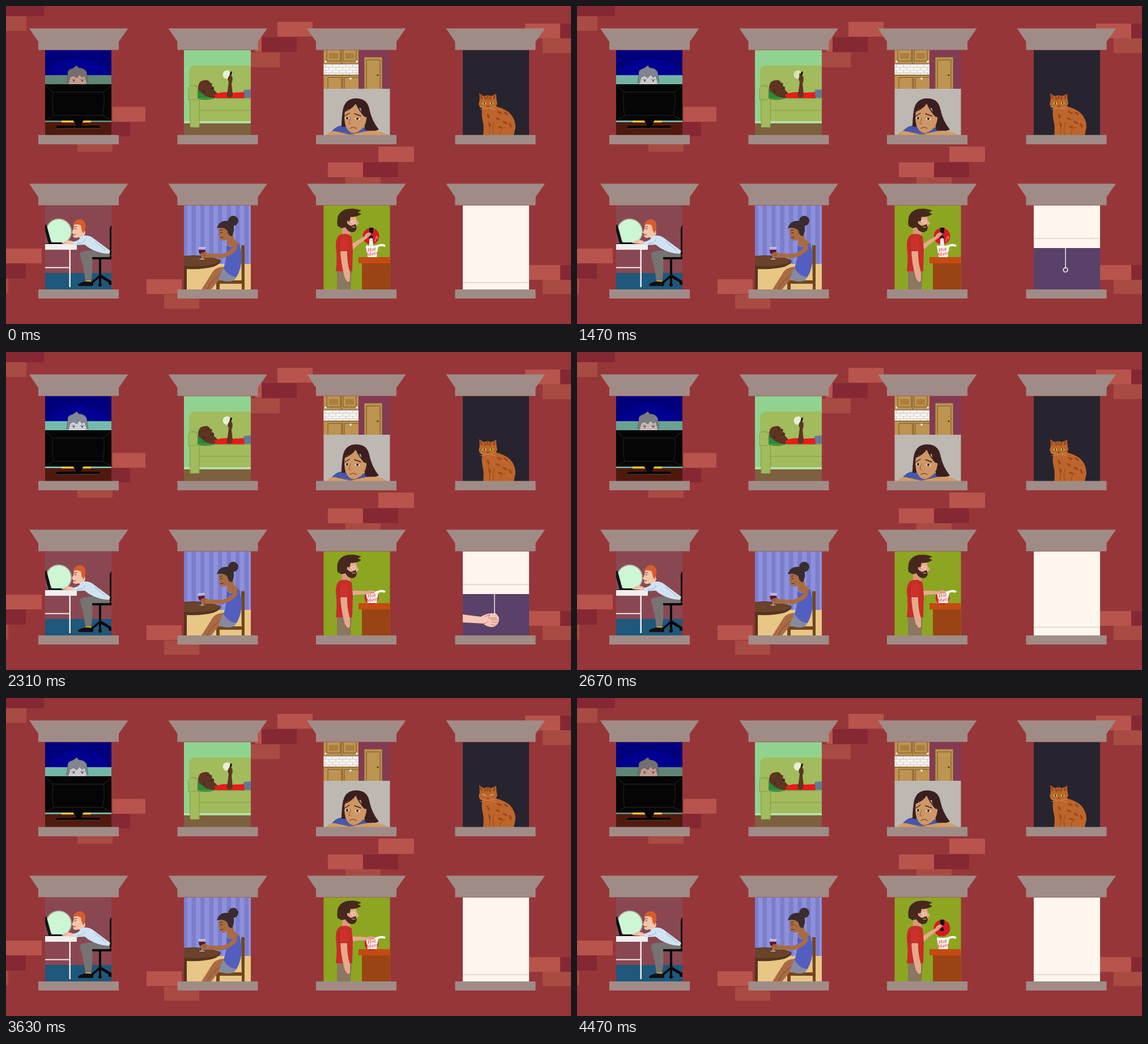
An HTML page that plays this animation: 997x561 px, repeating every 4.5 s.

```html
<!DOCTYPE html>
<html lang="en">
<head>
<meta charset="utf-8">
<title>Windows</title>
<style>
html, body { margin: 0; width: 100%; height: 100%; overflow: hidden; background: #973639; }
svg { display: block; }
#stage { width: 100vw; height: 100vh; }
.line { fill: none; stroke-linecap: round; stroke-linejoin: round; }
.stone { fill: #a08c86; }
.light { fill: #b8544c; }
.dark { fill: #852834; }
.mid { fill: #a84b43; }

/* every part shares the same 4.5 s loop */
.glow, .thumb, .phone, .open, .shut, .catopen, .catshut, .glass, .kettle, .arm, .pour, .blind, .reach {
  animation: 4.5s linear infinite;
}
.glow { animation-name: glow; }
@keyframes glow {
  0%, 3% { opacity: 0 } 7% { opacity: .5 } 10% { opacity: .2 } 15%, 18% { opacity: 1 }
  22% { opacity: .6 } 27% { opacity: .9 } 34% { opacity: .75 } 39% { opacity: .5 }
  45% { opacity: .9 } 53% { opacity: .9 } 59% { opacity: .5 } 66%, 69% { opacity: 0 }
  74% { opacity: .6 } 80%, 83% { opacity: .8 } 89% { opacity: .4 } 96%, 100% { opacity: 0 }
}
.thumb { animation-name: thumb; }
@keyframes thumb {
  0%, 28% { transform: none } 32%, 34% { transform: translate(-2px, -3px) } 38%, 100% { transform: none }
}
.phone { animation-name: phone; }
@keyframes phone {
  0%, 28% { opacity: .9 } 32%, 34% { opacity: .7 } 38%, 100% { opacity: .9 }
}
.open { animation-name: open; animation-timing-function: step-end; }
.shut { animation-name: shut; animation-timing-function: step-end; }
@keyframes open { 0%, 18.67%, 100% { opacity: 1 } 14.67% { opacity: 0 } }
@keyframes shut { 0%, 18.67%, 100% { opacity: 0 } 14.67% { opacity: 1 } }
.catopen { animation-name: catopen; animation-timing-function: step-end; }
.catshut { animation-name: catshut; animation-timing-function: step-end; }
@keyframes catopen { 0%, 92%, 100% { opacity: 1 } 65.33% { opacity: 0 } }
@keyframes catshut { 0%, 92%, 100% { opacity: 0 } 65.33% { opacity: 1 } }
.type { animation: type .3s linear infinite alternate; }
@keyframes type { to { transform: translate(-1px, -1px) } }
.glass { animation-name: glass; transform-origin: 347px 442px; animation-timing-function: ease-in-out; }
@keyframes glass {
  0%, 38% { transform: none } 44% { transform: rotate(4deg) } 51% { transform: rotate(-6deg) }
  57% { transform: rotate(4deg) } 63%, 100% { transform: none }
}
.kettle { animation-name: kettle; transform-origin: 644px 406px; animation-timing-function: ease-in-out; }
@keyframes kettle {
  0%, 38% { transform: none } 49%, 87% { transform: translate(1px, 27px) scale(.85) } 98%, 100% { transform: none }
}
.arm { animation-name: arm; transform-origin: 610px 424px; animation-timing-function: ease-in-out; }
@keyframes arm {
  0%, 38% { transform: rotate(-34deg) } 49%, 87% { transform: none } 98%, 100% { transform: rotate(-34deg) }
}
.pour { animation-name: pour; animation-timing-function: step-end; }
@keyframes pour { 0% { opacity: 1 } 37.33%, 100% { opacity: 0 } }
.stream { animation: stream .3s linear infinite; }
@keyframes stream { to { stroke-dashoffset: -10 } }
.blind { animation-name: blind; animation-timing-function: ease-in-out; }
@keyframes blind {
  0%, 9% { transform: none } 15.6% { transform: translateY(-94px) } 19% { transform: translateY(-74px) }
  22.5%, 51.5% { transform: translateY(-78px) } 60.5%, 100% { transform: none }
}
.reach { animation-name: reach; animation-timing-function: ease-out; }
@keyframes reach {
  0%, 36% { transform: translateX(-70px) } 49%, 66% { transform: none } 66.1%, 100% { transform: translateX(-70px) }
}
</style>
</head>
<body>
<svg id="stage" viewBox="0 0 997 561" preserveAspectRatio="none">
<defs>
  <g id="frame" class="stone">
    <path d="M41 39.5H215.5L199 63V77.5H57V63z"/>
    <path d="M57 227.5H199V244H57z"/>
  </g>
  <g id="frameLow" class="stone">
    <path d="M41 313.5H215.5L199 337V351.5H57V337z"/>
    <path d="M57 500H199V516H57z"/>
  </g>
  <radialGradient id="sky" cx="50%" cy="100%" r="100%" fy="100%">
    <stop offset="0" stop-color="#0000a4"/><stop offset="1" stop-color="#00008c"/>
  </radialGradient>
  <radialGradient id="screen">
    <stop offset=".88" stop-color="#cdf6d5"/><stop offset="1" stop-color="#cdf6d5" stop-opacity=".2"/>
  </radialGradient>
  <pattern id="tiles" width="12" height="10" patternUnits="userSpaceOnUse" x="561" y="103">
    <path d="M0 0H12V10H0z" fill="#f7f5f2"/>
    <path d="M0 0H12M0 5H12M3 0V5M9 5V10" stroke="#bdb7b2" stroke-width=".8"/>
  </pattern>
  <pattern id="curtain" width="15.5" height="10" patternUnits="userSpaceOnUse" x="319.5">
    <path d="M0 0H16V10H0z" fill="#7b7ecb"/>
    <path d="M0 0H8V10H0z" fill="#8d91dc"/>
  </pattern>
  <path id="face" d="M111 124Q127 117 142 124L141 139H111z"/>
  <path id="hair" d="M107 136L109 120Q108 112 118 110L125 105L128 109Q143 110 143 122L145 136L141 131L139 123L134 126L130 121L125 127L119 123L113 126L111 134z"/>
</defs>

<path d="M0 0H997V561H0z" fill="#973639"/>
<path class="light" d="M479 28h62v26h-62zM440 55h11v26h-11zM188 178h58v26h-58zM657 248h63v27h-63zM568 276h62v26h-62zM916 31h62v26h-62zM0 428h63v26H0zM248 482h62v26h-62zM923 457h55v26h-55z"/>
<path class="dark" d="M0 0h67v18H0zM451 55h62v26h-62zM186 205h33v25h-33zM630 276h62v26h-62zM978 31h19v26h-19zM0 454h35v27H0zM978 457h19v26h-19z"/>
<path class="mid" d="M0 18h36v26H0zM421 82h62v26h-62zM126 244h62v13h-62zM599 302h62v12h-62zM947 57h50v26h-50zM0 481h4v26H0zM279 509h62v25h-62zM947 483h50v25h-50z"/>

<!-- television -->
<svg x="69" y="78" width="117" height="150" viewBox="69 78 117 150">
  <path d="M69 78H187V123H69z" fill="#00007c"/>
  <ellipse cx="128" cy="124" rx="53" ry="32" fill="url(#sky)"/>
  <path d="M69 122H187V206H69z" fill="#5f8675"/>
  <path class="glow" d="M69 122H187V206H69z" fill="#78c2b2"/>
  <path d="M69 205H187V228H69z" fill="#50190e"/>
  <use href="#face" fill="#c59c8e"/>
  <use href="#hair" fill="#746f6e"/>
  <g class="glow">
    <use href="#face" fill="#ccd8e0"/>
    <use href="#hair" fill="#838b98"/>
  </g>
  <use href="#hair" class="line" stroke="#55555c" stroke-width=".6"/>
  <path class="line" d="M116 130Q119 128 122 130M131 130Q134 128 138 130" stroke="#6d6065" stroke-width="1"/>
  <path d="M118 131h3v2h-3zM133 131h3v2h-3z" fill="#4a3a3c"/>
  <path d="M98 202H122V205.5H98zM134 202H150V205.5H134z" fill="#e2ca42"/>
  <path d="M69 138H187V202H69z" fill="#050505"/>
  <path class="line" d="M71 141L83 152H172L185 141M83 152Q80 174 84 193H170Q175 174 172 152M84 193L72 200M170 193L184 200" stroke="#1c1c1d" stroke-width="1.4"/>
  <path d="M118 201H137L132 211H164L167 215.5L87 216L90 211.5L124 211z" fill="#050505"/>
  <path class="line" d="M88 216L166 215.5" stroke="#6b5a55" stroke-width=".7"/>
</svg>

<!-- sofa -->
<svg x="314" y="78" width="118" height="150" viewBox="314 78 118 150">
  <path d="M314 78H433V228H314z" fill="#90d390"/>
  <path d="M314 207H433V228H314z" fill="#7d603d"/>
  <path d="M314 203H433V207H314z" fill="#b5dfa6"/>
  <path d="M323 150V116Q323 105 335 105H433V203H323z" fill="#a1bb5d"/>
  <path d="M433 147L420 148L416 162H433z" fill="#657996"/>
  <path d="M337 163Q334 148 344 140L366 154L369 163Q350 168 337 163z" fill="#278b38"/>
  <path d="M339 142Q341 131 350 131Q357 129 360 135L364 137L363 141L367 143L367 148L372 153L378 158L366 163Q351 160 346 154Q338 149 339 142z" fill="#5e3522"/>
  <path d="M355 135l3 3M361 146l4-1M348 148l2 4" class="line" stroke="#2c1510"/>
  <path d="M367 157Q380 150 397 153L420 152L421 163H371z" fill="#ea1a1c"/>
  <circle class="phone" cx="390" cy="121" r="7.5" fill="#eef7dd"/>
  <path d="M396 115.5L399 116L396 129L393 128z" fill="#131114"/>
  <path d="M391 161Q388 157 391 150L393 134Q389 127 394 123L399 124Q401 130 398 137L400 156Q399 164 391 161z" fill="#5e3522"/>
  <path class="thumb line" d="M396 128L396 123" stroke="#5e3522" stroke-width="3.5"/>
  <g class="line" stroke="#7f9848" stroke-width="1">
    <path d="M341 163H433M341 184H433M338 142Q328 138 323 143V163H339M341 164V203"/>
  </g>
  <path d="M322 146Q322 140 331 141Q338 141 338 147V164H341V214H325V165H322z" fill="#a1bb5d" stroke="#849d4b" stroke-width=".8"/>
  <path class="line" d="M322 165H337" stroke="#849d4b"/>
</svg>

<!-- woman at the sill -->
<svg x="560.5" y="78" width="117" height="150" viewBox="560.5 78 117 150">
  <path d="M560 78H678V150H560z" fill="#843a54"/>
  <path d="M560 78H622V148H560z" fill="#bd9451"/>
  <path d="M560 102H622V121H560z" fill="url(#tiles)"/>
  <g class="line" stroke="#745126" stroke-width="1">
    <path d="M560 102H622M560 122H623M566 78V97H590V78M595 78V97H618V78M592 78V102M568 146V126H592V146M597 146V126H622M594 124V147"/>
    <path d="M632 147V90H664V147M636 147V95H660V147" fill="#bd9451"/>
  </g>
  <path d="M570 83h16v10h-16zM599 83h15v10h-15z" fill="#aa7e3d"/>
  <g fill="#fff"><circle cx="564" cy="98" r="1.7"/><circle cx="619" cy="98" r="1.7"/><circle cx="608" cy="128" r="1.8"/></g>
  <circle cx="656" cy="122" r="1.6" fill="#503615"/>
  <path d="M560 146H678V228H560z" fill="#bdb8b2"/>
  <path d="M573 224Q582 209 600 211L630 214Q646 213 654 226L650 228H576z" fill="#4358ad"/>
  <path d="M592 213Q592 201 594 186Q597 163 618 163Q637 163 641 181Q645 202 658 218Q648 223 634 219L626 180L602 182L599 213z" fill="#3b1f1f"/>
  <path d="M598 185Q596 201 599 210Q604 225 615 224Q629 220 634 208L636 200Q637 194 632 195Q624 187 617 172Q609 183 598 185z" fill="#cf9765"/>
  <path class="line" d="M617 171Q609 182 597 186M618 171Q624 187 634 195" stroke="#3b1f1f" stroke-width="2"/>
  <g class="line" stroke="#3b1f1f">
    <path d="M598 194L606 189M615 190L626 194" stroke-width="1.4"/>
    <path d="M608 197L605 207L609 208" stroke="#915b39" stroke-width="1"/>
    <path d="M607 216Q612 212 618 216" stroke="#743d2f" stroke-width="1.2"/>
  </g>
  <g class="open">
    <path d="M598 198Q602 194 606 198Q602 202 598 198zM615 199Q620 195 625 200Q620 203 615 199z" fill="#f4e9e2"/>
    <circle cx="602" cy="198" r="2" fill="#2c1717"/><circle cx="620" cy="199" r="2.1" fill="#2c1717"/>
  </g>
  <path class="shut line" d="M598 198Q602 202 606 198M615 199Q620 204 625 200" stroke="#3b1f1f" stroke-width="1.3"/>
  <path d="M565 228Q571 219 581 221L606 227L635 221Q660 217 673 228z" fill="#d39b67"/>
  <path class="line" d="M588 222Q604 225 617 228M608 226L634 221" stroke="#a26d43" stroke-width=".8"/>
</svg>

<!-- cat -->
<svg x="806" y="78" width="117" height="150" viewBox="806 78 117 150">
  <path d="M806 78H924V228H806z" fill="#27242f"/>
  <path d="M841 178L864 177Q881 181 890 190Q899 200 899 214L896 228H842Q844 213 841 202Q838 188 841 178z" fill="#bd652b"/>
  <path d="M835 154L843 159Q850 156 856 159L865 155Q865 165 867 172Q864 182 850 184Q836 182 834 173Q837 166 835 154z" fill="#bd652b"/>
  <path class="line" d="M850 159v4M845 161l1 3M855 161l-1 3M838 158l1 5M862 158l-1 5M868 187l5 2M880 188l4 3M866 198l4 2M878 204l5 3M889 208l2 5M870 213l4 1M850 192l2 5M853 208l1 4" stroke="#9b491f" stroke-width="3.4"/>
  <path class="line" d="M851 203Q856 216 852 228M862 205Q857 217 861 228M872 227Q871 216 881 214" stroke="#91441e" stroke-width=".9"/>
  <g class="catopen">
    <ellipse cx="844" cy="172" rx="3.3" ry="2.5" fill="#cbbd3e"/><ellipse cx="857" cy="172" rx="3.3" ry="2.5" fill="#cbbd3e"/>
    <path d="M843.3 170h1.5v4h-1.5zM856.3 170h1.5v4h-1.5z" fill="#17130f"/>
  </g>
  <path class="catshut line" d="M841 170l6 2M854 172l6-2" stroke="#ecc493" stroke-width="1.2"/>
  <path d="M848 176h5l-2.5 3z" fill="#8b4427"/>
  <path class="line" d="M846 179l-10-1M846 181l-9 2M855 179l10-1M855 181l9 2M847 181l3.5-1 3.5 1" stroke="#dfab7c" stroke-width=".6"/>
</svg>

<!-- desk -->
<svg x="69" y="352" width="117" height="148" viewBox="69 352 117 148">
  <path d="M69 352H187V472H69z" fill="#894752"/>
  <path d="M69 471H187V500H69z" fill="#1e587a"/>
  <circle cx="93" cy="398" r="23.5" fill="url(#screen)"/>
  <path d="M69 420H125V430H114V496H111.5V430H69z" fill="#f0eeee"/>
  <path d="M69 460.5H112V462.5H69z" fill="#f0eeee"/>
  <path d="M69 386H71.5L80 417H110V420H69z" fill="#111214"/>
  <path d="M69 397L75 419H69z" fill="#894752"/>
  <path d="M187 387Q182 388 183 402V440H187zM146 441H187V447H146zM164 446H168V474L187 486V491L168 480V491H164V480L151 491L149 488L164 475z" fill="#08080a"/>
  <g fill="#08080a"><circle cx="151" cy="491" r="3"/><circle cx="166" cy="492" r="3"/><circle cx="184" cy="489" r="3"/></g>
  <path d="M131 435Q140 431 158 431L183 436V443H152Q154 464 150 486H140Q138 463 131 442z" fill="#767371"/>
  <path d="M141 484H150V489H141z" fill="#d7a529"/>
  <path d="M127 491Q137 484 151 487V494H128z" fill="#111014"/>
  <path d="M120 385L119 393L116 400L119 402L118 406Q121 411 128 408L135 411L140 401L137 384z" fill="#f4c4a9"/>
  <path d="M118 386Q122 376 131 376Q142 378 140 392L137 401L134 397L132 387L126 385z" fill="#d85b2c"/>
  <path class="line" d="M120 390l5-1M121 393h3M119 404l4-1" stroke="#6f3727" stroke-width="1"/>
  <path d="M131 407Q144 401 156 411L184 432L182 437Q170 437 160 433Q148 429 139 421L118 422L117 416Q131 414 131 407z" fill="#cfe3f2"/>
  <path class="line" d="M139 412Q139 419 126 419M157 415L176 431" stroke="#94abc4" stroke-width=".9"/>
  <g class="type">
    <path d="M118 415L108 413Q101 415 98 419L104 420L118 421z" fill="#f4c4a9"/>
    <path class="line" d="M103 418l5-2" stroke="#c68f7a" stroke-width=".8"/>
  </g>
</svg>

<!-- wine -->
<svg x="314" y="352" width="118" height="148" viewBox="314 352 118 148">
  <path d="M314 352H433V500H314z" fill="url(#curtain)"/>
  <path d="M314 455H433V500H314z" fill="#e8c685"/>
  <path d="M415 422H421V500H416zM371 484H421V490H377V500H371z" fill="#74461f"/>
  <path d="M314 441Q349 437 378 448Q381 454 366 460Q349 465 319 464V500H314z" fill="#56351f"/>
  <path d="M314 442Q349 439 376 448Q378 455 350 458Q330 460 314 458z" fill="#6b432b"/>
  <path d="M384 460Q369 461 364 470L345 500H362L375 484L397 481z" fill="#a96b43"/>
  <path class="line" d="M355 500Q362 483 382 472" stroke="#774427" stroke-width=".9"/>
  <path d="M384 460L408 466Q409 486 393 486Q382 486 375 481z" fill="#858aa0"/>
  <path d="M377 389L375 402L378 411Q384 417 390 411L390 421L403 427L413 420L402 411L400 389z" fill="#a96b43"/>
  <path d="M372 392Q376 378 391 379Q404 382 402 397L399 406Q392 406 391 397Q386 389 372 392z" fill="#3a2c2e"/>
  <circle cx="401" cy="379" r="9" fill="#3a2c2e"/>
  <path class="line" d="M377 396l5-1M378 400h4M378 409l5-1" stroke="#432117" stroke-width="1"/>
  <path d="M389 422Q399 430 412 419L416 440Q416 462 407 478Q392 477 384 462Q390 445 389 422z" fill="#535fc0"/>
  <g class="glass">
    <path d="M340 426H352Q353 438 346 440Q339 438 340 426z" fill="#c3c2e8" opacity=".7"/>
    <path d="M340 430H352Q352 438 346 440Q340 438 340 430z" fill="#61142f"/>
    <path class="line" d="M346 440V446M342 446.5H350M340 426H352" stroke="#e5ddea" stroke-width="1"/>
  </g>
  <path class="line" d="M405 426Q397 437 382 441L353 440" stroke="#a96b43" stroke-width="7.5"/>
  <path d="M343 437Q351 431 358 437L356 444L347 444z" fill="#a96b43"/>
  <path class="line" d="M347 437h5M348 440h4" stroke="#774427" stroke-width=".8"/>
  <path class="line" d="M409 421V431" stroke="#535fc0" stroke-width="3"/>
</svg>

<!-- noodles -->
<svg x="560.5" y="352" width="117" height="148" viewBox="560.5 352 117 148">
  <path d="M560 352H678V500H560z" fill="#8ca621"/>
  <path d="M628 453H678V500H628z" fill="#9a4414"/>
  <path d="M622 443H678V454H622z" fill="#c54b11"/>
  <g class="kettle">
    <circle cx="644" cy="406" r="14.5" fill="#d31c20"/>
    <path d="M641 391H648V401H641z" fill="#151214"/>
    <circle cx="644" cy="408" r="3.5" fill="#201417"/>
    <path class="pour line" d="M633 410l2-6M651 415l3-9M655 411l1-4" stroke="#f0c8c6" stroke-width=".9"/>
  </g>
  <g class="pour">
    <path d="M641 412Q644 407 647 411L648 424H641z" fill="#f4f3f0"/>
    <path class="line stream" d="M644 411V424" stroke="#b9cad0" stroke-width="1.4" stroke-dasharray="4 6"/>
  </g>
  <path d="M635 424H657L654 443H638z" fill="#fbf8f4"/>
  <path d="M635 422Q646 425 657 421Q664 418 670 422L668 425Q661 422 656 426H636z" fill="#fbf8f4"/>
  <g transform="rotate(-10 646 434)" font-family="'DejaVu Serif', serif" font-style="italic" font-size="8" text-anchor="middle" fill="#cf1d25">
    <text x="646" y="432.5">Hot</text><text x="646" y="440">Mein</text>
  </g>
  <g class="arm">
    <path d="M604 421L622 421L638 422Q645 418 651 422L650 426L641 427L620 428L604 431z" fill="#e7a98b"/>
    <path class="line" d="M641 423.5l8 1" stroke="#b77560" stroke-width=".8"/>
  </g>
  <path d="M584 465H610L608 500H584z" fill="#8b7660"/>
  <path d="M593 388H606L608 405H593z" fill="#d9967a"/>
  <path d="M598 370H617L619 378L623 384L619 387L618 396H600z" fill="#e7a98b"/>
  <path d="M585 388Q581 362 603 358Q616 356 627 361L621 364L627 367Q619 373 608 372L606 382L602 379L601 390L592 392z" fill="#46291c"/>
  <path d="M600 381Q605 387 609 388L617 385L619 391Q618 399 610 399Q602 398 599 390z" fill="#46291c"/>
  <path class="line" d="M604 380H611M611 378h5v5h-5zM611 390h5" stroke="#f2dfd4" stroke-width=".9"/>
  <path d="M590 403Q604 400 610 407L612 429L611 468H582Q585 444 582 426Q581 408 590 403z" fill="#c72d27"/>
  <path d="M590 427H602Q601 451 607 470V485L603 487L598 480Q590 452 590 427z" fill="#e7a98b"/>
  <path d="M588 414Q596 402 603 413L604 432H588z" fill="#cc322b"/>
  <path class="line" d="M588 414V432H604" stroke="#8e1e1d" stroke-width=".8"/>
</svg>

<!-- blind -->
<svg x="806" y="352" width="117" height="148" viewBox="806 352 117 148">
  <path d="M806 352H924V500H806z" fill="#5a4169"/>
  <g class="blind">
    <path d="M806 330H924V505H806z" fill="#fff6ed"/>
    <path d="M806 487.3H924V488.7H806z" fill="#d9d0ca"/>
    <path class="line" d="M862 505V540" stroke="#ece4e6" stroke-width="1.6"/>
    <circle cx="862" cy="543.5" r="3.8" fill="none" stroke="#ece4e6" stroke-width="1.8"/>
    <g transform="translate(0 78)">
      <g class="reach">
        <path d="M730 462L806 463L838 467Q849 460 858 461Q870 462 870 472Q869 482 860 485Q849 486 842 479L806 477L730 477z" fill="#f5c7b8"/>
        <path class="line" d="M854 463Q848 468 855 470L865 469M857 473L868 472M857 477L867 477M856 481L863 482M845 467Q850 464 854 464M842 479Q848 479 851 475" stroke="#b9796f" stroke-width="1"/>
      </g>
    </g>
  </g>
</svg>

<use href="#frame"/><use href="#frame" x="245.5"/><use href="#frame" x="490"/><use href="#frame" x="735.5"/>
<use href="#frameLow"/><use href="#frameLow" x="245.5"/><use href="#frameLow" x="490"/><use href="#frameLow" x="735.5"/>
</svg>
</body>
</html>
```
